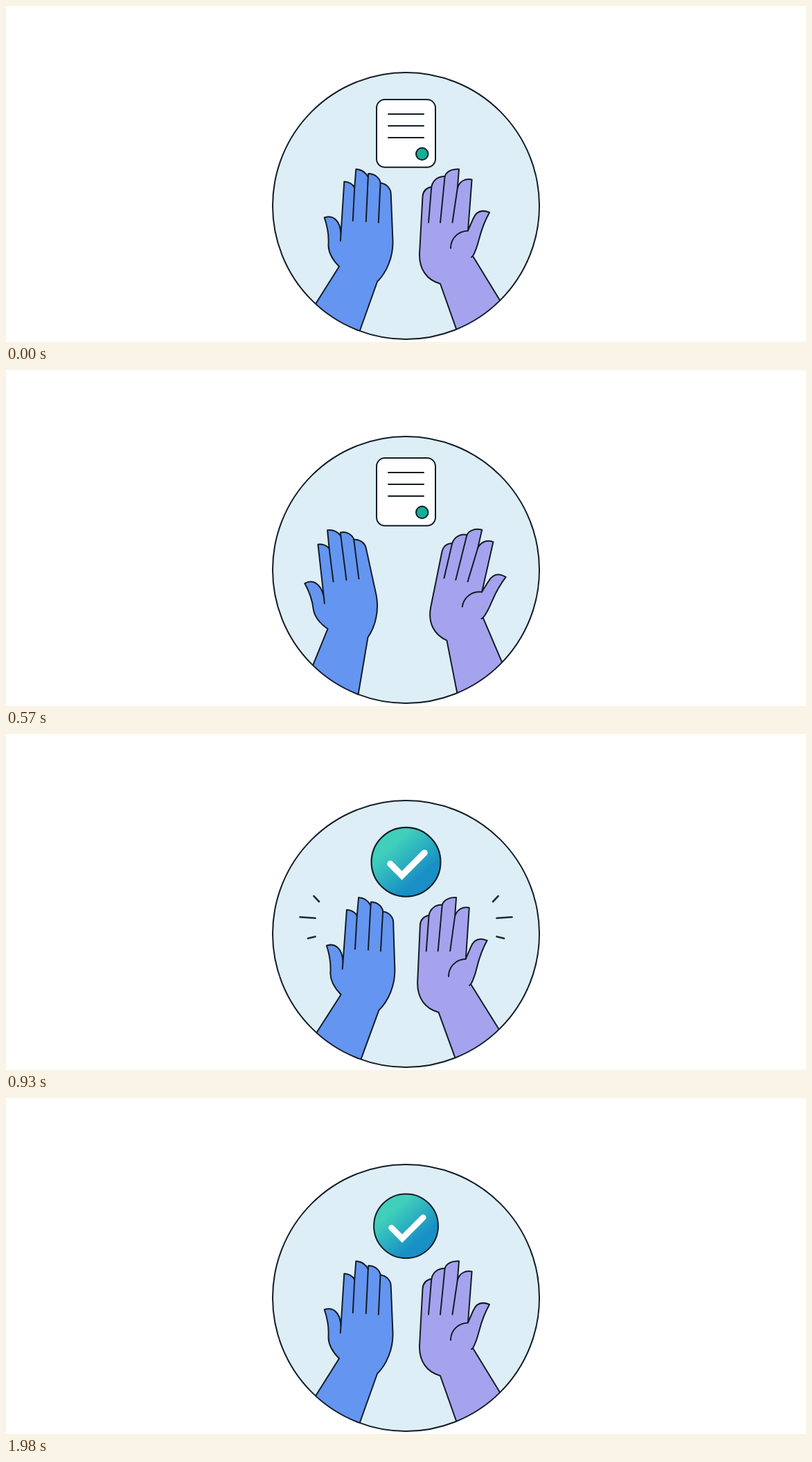
These frames come from a looping animation (1155x485 px, 2.7 s). An HTML page:

```html
<!DOCTYPE html>
<html lang="en">
<head>
<meta charset="utf-8">
<title>Clapping hands</title>
<style>
  html, body { margin: 0; width: 100%; height: 100%; overflow: hidden; background: #fff; }
  svg { display: block; width: 1155px; height: 485px; }
  .ink { stroke: #121c26; stroke-width: 2; stroke-linecap: round; stroke-linejoin: round; }
  .open { fill: none; }
  .ray { stroke: #1c2a35; stroke-width: 2.6; stroke-linecap: round; }
</style>
</head>
<body>
<svg viewBox="0 0 1155 485">
  <defs>
    <clipPath id="disc"><circle cx="577.5" cy="288.5" r="192.5"/></clipPath>
    <linearGradient id="sea" gradientUnits="userSpaceOnUse" x1="-19" y1="-22" x2="18" y2="21">
      <stop offset="0" stop-color="#40cfbb"/>
      <stop offset="1" stop-color="#1890c5"/>
    </linearGradient>
  </defs>

  <circle cx="577.5" cy="288.5" r="192.5" fill="#ddeef6"/>

  <g clip-path="url(#disc)">
    <g id="left" class="ink">
      <path fill="#6495f0" d="M396 511 L481 376 C471 366 465.5 355 465.5 345 C466.5 330 464 318 459.7 305.5
        C471 301.5 482.5 308 483.5 329 L488.3 253.5 C494.5 253.5 500.5 257 503.2 262
        L505.3 235.6 C513 236 519.5 240.5 522.8 247 L523.3 242 C532 242 539 247.5 540.8 255.5
        C549 256.5 555.5 263 555.7 271 L558.5 340 C558.8 362 550 384 536 398 L489 530 Z"/>
      <path class="open" d="M483.5 329 L482.8 339 M503.2 262 L500.8 310 M522.8 247 L519.8 311 M540.5 255.5 L537.8 312.5"/>
    </g>
    <g id="right" class="ink">
      <path fill="#a5a3ee" d="M767 513 L674 361 C685 342 681 328 698 298
        C686 293 678.5 297.5 674.5 307 L667 324 L672.6 250.5 C663 248.5 654.5 253 651.8 263
        L654 235.6 C643.5 234.5 635.5 239.5 633.6 246 C624 245.5 616 251.5 614.3 261
        C607 262.5 602 267.5 601.5 275 L597 358 C596.5 380 607.5 395.5 627 401 L673 531 Z"/>
      <path class="open" d="M674 361 L672 362.5 M667 324.5 C652 325 642 336 642 349.5
        M651.8 263 L644.5 312.5 M633.6 246 L627 312.5 M614.3 261 L610 312.5"/>
    </g>
  </g>

  <g id="rays"></g>

  <g id="page" class="ink">
    <rect x="-42.5" y="-48.8" width="85" height="97.6" rx="12" fill="#fff"/>
    <path class="open" d="M-25.5 -27.8 h51 M-25.5 -10.8 h51 M-25.5 6.2 h51"/>
    <circle cx="23.2" cy="29.6" r="8.7" fill="#13b097"/>
  </g>

  <g id="badge">
    <circle class="ink" r="46.4" fill="url(#sea)"/>
    <path d="M-21 2.5 L-5.5 18 L24.8 -12.3" fill="none" stroke="#fff" stroke-width="8.6" stroke-linecap="round"/>
  </g>

  <circle class="ink open" cx="577.5" cy="288.5" r="192.5"/>
</svg>

<script>
const LOOP = 2700, STEP = 30, CENTER = 577.5;
const $ = id => document.getElementById(id);
const sine = u => (1 - Math.cos(Math.PI * u)) / 2;
const cubic = u => u < .5 ? 4 * u ** 3 : 1 - 4 * (1 - u) ** 3;
const progress = (t, from, to, ease) => ease(Math.min(1, Math.max(0, (t - from) / (to - from))));
const mix = (a, b, u) => a + (b - a) * u;

// Value of a track of [time, value] keys, eased between neighbours.
function track(keys, t, ease) {
  let value = keys[0][1];
  for (let i = 1; i < keys.length; i++) {
    value = mix(value, keys[i][1], progress(t, keys[i - 1][0], keys[i][0], ease));
  }
  return value;
}

const hands = [
  { node: $('left'), pivot: [459, 479], open: -12.3, closed: 3.3, shift: 11.5 },
  { node: $('right'), pivot: [705, 473], open: 10.4, closed: -3.4, shift: -12.6 }
];

const rayEnds = [
  [446.5, 265.8, 410, 263.2],
  [452, 242, 439.3, 228.7],
  [446.5, 292.4, 429, 296.8]
];
const rays = [];
for (const mirrored of [false, true]) {
  for (const ends of rayEnds) {
    const node = document.createElementNS('http://www.w3.org/2000/svg', 'line');
    node.setAttribute('class', 'ray');
    if (mirrored) node.setAttribute('transform', 'translate(1155) scale(-1 1)');
    $('rays').append(node);
    rays.push({ node, ends });
  }
}

function place(node, x, y, scale) {
  node.setAttribute('transform', `translate(${x} ${y}) scale(${scale})`);
  node.style.display = scale > .01 ? '' : 'none';
}

function draw(t) {
  for (const { node, pivot, open, closed, shift } of hands) {
    const angle = track([[0, 0], [350, open], [460, open], [790, closed], [1000, 0]], t, cubic);
    const dx = track([[460, 0], [790, shift], [1000, 0]], t, cubic);
    node.setAttribute('transform', `translate(${dx} 0) rotate(${angle} ${pivot})`);
  }

  const lift = track([[0, 0], [380, -16], [760, 0]], t, sine);
  place($('page'), CENTER, 183.9 + lift, 1 - progress(t, 710, 790, sine));
  place($('badge'), CENTER, 184.8, track([[750, 0], [870, 1.078], [1480, 1]], t, sine));

  const head = progress(t, 760, 1060, sine);
  const tail = progress(t, 1100, 1600, sine);
  $('rays').style.display = head - tail > .01 ? '' : 'none';
  for (const { node, ends: [x1, y1, x2, y2] } of rays) {
    node.setAttribute('x1', mix(x1, x2, tail));
    node.setAttribute('y1', mix(y1, y2, tail));
    node.setAttribute('x2', mix(x1, x2, head));
    node.setAttribute('y2', mix(y1, y2, head));
  }
}

const start = performance.now();
function tick() {
  const t = (performance.now() - start) % LOOP;
  draw(Math.floor(t / STEP) * STEP);
  requestAnimationFrame(tick);
}
tick();
</script>
</body>
</html>
```
